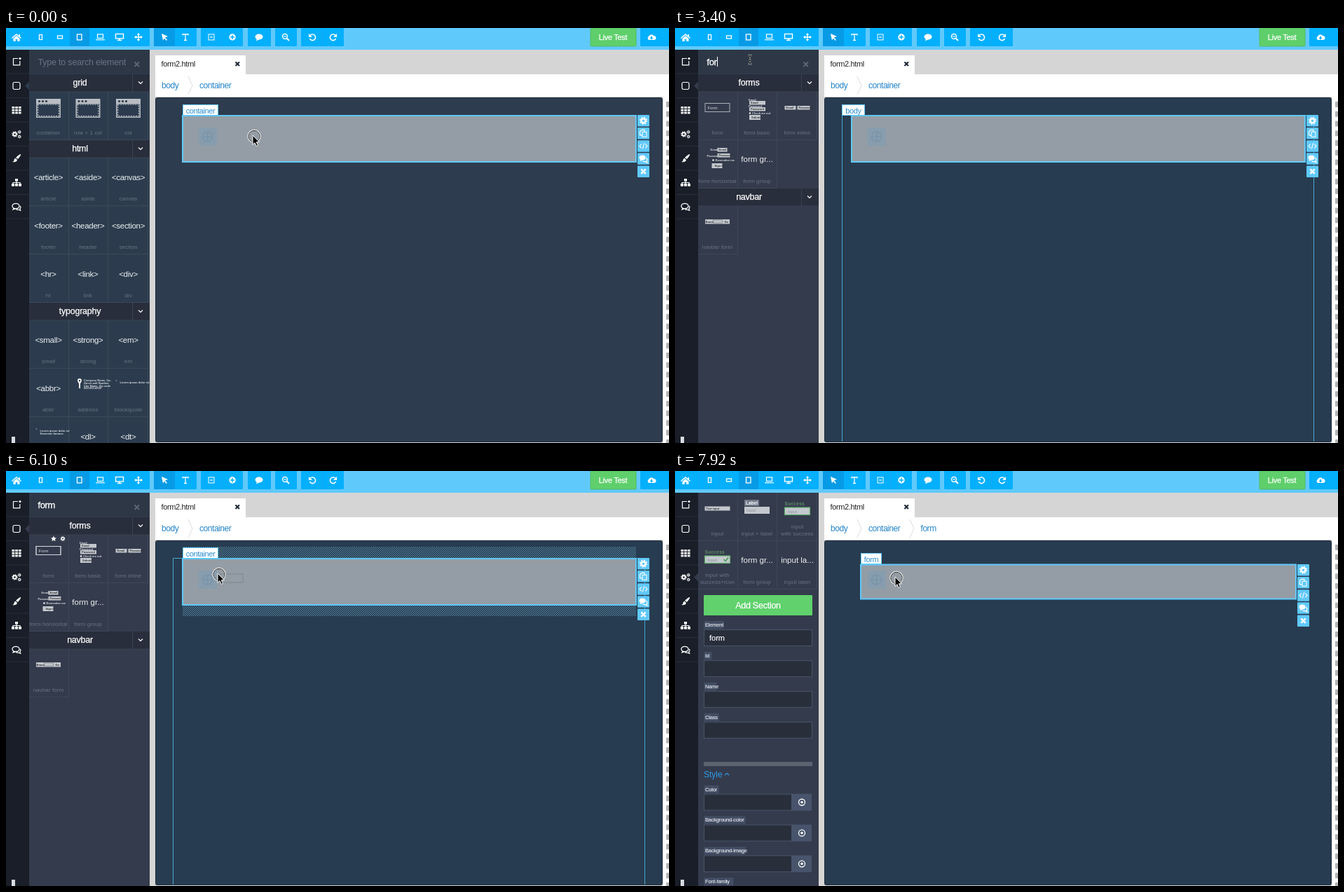
These frames come from a looping animation (946 by 592 pixels, 8000 ms). An HTML page:

```html
<!DOCTYPE html>
<html lang="en">
<head>
<meta charset="utf-8">
<title>Form builder</title>
<style>
html, body { margin: 0; width: 100%; height: 100%; overflow: hidden; background: #d5d5d5; }
svg { display: block; width: 946px; height: 592px; font-family: "Liberation Sans", Arial, sans-serif; }
text { white-space: pre; }
.tile { font-size: 8px; letter-spacing: .08px; fill: #687382; }
.code { font-size: 11.5px; letter-spacing: -.3px; fill: #eef0f2; }
.more { font-size: 11.5px; fill: #eef0f2; }
.head { font-size: 12.5px; letter-spacing: -.25px; fill: #fff; stroke: #fff; stroke-width: .25; }
.crumb { font-size: 12px; letter-spacing: -.45px; fill: #2585c8; }
.tag { font-size: 11px; letter-spacing: -.4px; fill: #2b8fce; }
.tab { font-size: 11px; letter-spacing: -.35px; fill: #222; }
.live { font-size: 11px; letter-spacing: -.3px; fill: #fff; stroke: #fff; stroke-width: .25; }
.hint { font-size: 12.5px; letter-spacing: -.2px; fill: #667384; }
.typed { font-size: 13px; letter-spacing: -.4px; fill: #fff; stroke: #fff; stroke-width: .35; }
.label { font-size: 7.5px; letter-spacing: -.2px; fill: #e4e8ee; stroke: #e4e8ee; stroke-width: .15; }
.field { font-size: 11px; fill: #fff; stroke: #fff; stroke-width: .2; }
.style { font-size: 12px; fill: #2f9be6; }
.tiny { font-size: 4px; fill: #d8dce0; font-weight: bold; }
.dark { font-size: 4px; fill: #333; font-weight: bold; }
</style>
</head>
<body>
<svg id="stage" viewBox="0 0 946 592"></svg>
<script>
const BLUE = '#04affb', SKY = '#60c9fb', LINE = '#3d4858', GREY = '#949da5';

const rect = (x, y, w, h, fill, more = '') =>
  `<rect x="${x}" y="${y}" width="${w}" height="${h}" fill="${fill}" ${more}/>`;
const frame = (x, y, w, h, color, width = 1, fill = 'none') =>
  rect(x, y, w, h, fill, `stroke="${color}" stroke-width="${width}"`);
const text = (x, y, s, cls, anchor = 'start') =>
  `<text x="${x}" y="${y}" class="${cls}" text-anchor="${anchor}">${s.replace(/</g, '&lt;')}</text>`;
const line = (d, color = '#fff', width = 1.2) =>
  `<path d="${d}" fill="none" stroke="${color}" stroke-width="${width}"/>`;
const shape = (d, fill = '#fff') => `<path d="${d}" fill="${fill}"/>`;
const dot = (x, y, r, fill = '#fff') => `<circle cx="${x}" cy="${y}" r="${r}" fill="${fill}"/>`;
const ring = (x, y, r, color = '#fff', width = 1.2) =>
  `<circle cx="${x}" cy="${y}" r="${r}" fill="none" stroke="${color}" stroke-width="${width}"/>`;
const at = (x, y, body, scale = 1) => `<g transform="translate(${x} ${y}) scale(${scale})">${body}</g>`;
const group = (id, body) => `<g id="${id}">${body}</g>`;

// Icons are centred on 0,0.
const gear = ring(0, 0, 3, '#fff', 2.4) +
  `<circle r="4.8" fill="none" stroke="#fff" stroke-width="1.7" stroke-dasharray="1.9 1.87"/>`;
const bubble = '<ellipse cy="-.5" rx="5.5" ry="4" fill="#fff"/>' + shape('M-3 2L-4 5.5L1 3Z');
const chats = '<ellipse cx="-1.5" cy="-1.5" rx="4.5" ry="3.4" fill="#fff"/>' + shape('M-4 1L-5 4L-1 1.5Z') +
  line('M3.5 -1.5Q7 1 4.5 3.5L5.5 5.5L2 4Q0 4.3 -1 3.3', '#fff', 1.3);
const cross = line('M-3.2 -3.2L3.2 3.2M3.2 -3.2L-3.2 3.2', '#fff', 2.4);
const turn = line('M-3 -2.5A4.3 4.3 0 1 1 -3.6 2.2', '#fff', 1.6) + shape('M-5 -5V0H0Z');
const chevron = line('M-3 -1.5L0 1.5L3 -1.5');
const icons = {
  home: shape('M-7 0L0 -6L7 0L6 1L0 -4L-6 1ZM-4.5 1L0 -3L4.5 1V5H1.3V2H-1.3V5H-4.5ZM3.5 -5H5V-1H3.5Z'),
  pointer: shape('M-4 -5L5 -1L1 .5L4 4L2.7 5L0 1.7L-2 4.5Z'),
  move: line('M-4 0H4M0 -4V4', '#fff', 1.4) +
    shape('M-6 0L-3 -2.2V2.2ZM6 0L3 -2.2V2.2ZM0 -6L-2.2 -3H2.2ZM0 6L-2.2 3H2.2Z'),
  laptop: frame(-4, -4, 8, 5.5, '#fff', 1.2) + line('M-6.5 3.8H6.5'),
  desktop: frame(-5.5, -4.5, 11, 6.5, '#fff', 1.4) + line('M0 2V4.5M-3 4.5H3', '#fff', 1.5),
  type: line('M-4 -2.5V-4H4V-2.5M0 -4V4.5M-2 4.5H2', '#fff', 1.3),
  zoom: ring(-1, -1, 3.5, '#fff', 1.4) + line('M1.7 1.7L5 5', '#fff', 2) + line('M-2.8 -1H.8'),
  cloud: shape('M-4 4A3 3 0 0 1 -4 -1A4 4 0 0 1 3 -2A3 3 0 0 1 4 4Z') + shape('M-1 -1H1V1H2.5L0 3.5L-2.5 1H-1Z', BLUE),
  edit: line('M2 -4.5H-4.5V4.8H4.8V-1') + dot(5, -4.5, 1.6),
  square: `<rect x="-5" y="-5" width="10" height="10" rx="2" fill="none" stroke="#fff" stroke-width="1.2"/>`,
  grid: [0, 1, 2, 3, 4, 5, 6, 7, 8].map(i => rect(-6.5 + i % 3 * 4.7, -5 + (i / 3 | 0) * 3.8, 3.7, 2.8, '#fff')).join(''),
  gears: at(-2.5, 0, gear, .75) + at(4.2, -3.2, gear, .45) + at(4.2, 3.4, gear, .45),
  brush: shape('M6 -6Q7 -5 2 1L-1 -1Q4 -6 6 -6ZM-1.5 -.3L1 2Q0 6 -6 5Q-3 4 -3.5 2Q-3 0 -1.5 -.3Z'),
  tree: rect(-2, -5.5, 4, 3.5, '#fff') + line('M0 -2V2M-5 2V0H5V2') +
    [-7, -2, 3].map(x => rect(x, 1.5, 4, 3.7, '#fff')).join(''),
  chats: at(0, 0, '<ellipse cx="-1" cy="-1" rx="5" ry="3.7" fill="none" stroke="#fff" stroke-width="1.3"/>' +
    line('M5 -1Q7 1 4.7 3L5.7 5.3L2 4Q0 4.2 -1 3.6M-4 2L-5 4L-2 3'))
};

function topBar() {
  const plates = [[0, 205], [211, 61], [278, 60], [345, 33], [384, 31], [421, 61], [905, 41]];
  return rect(0, 0, 946, 31, SKY) + plates.map(([x, w]) => rect(x, 0, w, 26, BLUE, 'rx="1"')).join('') +
    rect(91, 0, 28, 26, '#079be6') + rect(211, 0, 30, 26, '#079be6') +
    line('M33.5 0V26M62.5 0V26M146.5 0V26M175.5 0V26M307.5 0V26M451.5 0V26', '#16a6ee', 1) +
    at(15, 14, icons.home) + frame(47.5, 9.5, 4, 7, '#fff', 1.3) + frame(73.5, 11, 7, 4, '#fff', 1.3) +
    frame(101.5, 9, 6.5, 8, '#fff', 1.3) + at(134.5, 13, icons.laptop) + at(162, 13, icons.desktop) +
    at(189, 13, icons.move) + at(226, 13, icons.pointer) + at(256, 13, icons.type) +
    frame(289, 9, 8, 8, '#fff') + line('M291 13H295') +
    dot(323, 13, 4.7) + line('M320 13H326M323 10V16', BLUE, 1.5) + at(361, 13, bubble) +
    at(399, 13, icons.zoom) + at(437, 13, turn) + `<g transform="translate(467 13) scale(-1 1)">${turn}</g>` +
    rect(834, 0, 65, 26, '#5fcf6b', 'rx="1" stroke="#52bd62"') + text(866, 17, 'Live Test', 'live', 'middle') +
    at(921, 13, icons.cloud);
}

function rail() {
  const names = ['edit', 'square', 'grid', 'gears', 'brush', 'tree', 'chats'];
  return rect(0, 31, 33, 561, '#191e28') + names.map((name, i) => {
    const y = 48 + i * 34.5;
    return at(15, y, icons[name]) + line(`M0 ${y + 17}H33`, '#292f3b', 1);
  }).join('') + rect(8, 583, 5, 9, '#d8dbdf') + '<path id="notch" d="M33 -6L27 0L33 6Z" fill="#2c3c4e"/>';
}

const heading = (y, name) => rect(33, y, 172, 25, '#282e3b') + line(`M180.5 ${y}V${y + 25}M33 ${y + 25}H205`, '#3a4251', 1) +
  text(105.5, y + 16, name, 'head', 'middle') + at(192, y + 12, chevron);

const colX = [60.5, 117, 174.5];
const tile = (col, y, label, body) => {
  const left = [33, 89, 146][col];
  return line(`M${left} ${y + 68.5}H${left + 56.5}V${y}`, LINE, 1) + at(colX[col], y, body) +
    label.split('|').map((s, i, all) => text(colX[col], y + 61 - (all.length - 1 - i) * 10, s, 'tile', 'middle')).join('');
};
const tag = name => text(0, 32, `<${name}>`, 'code', 'middle');
const windowThumb = rect(-17.5, 10, 35, 27, '#b9bdc2') + rect(-16, 17.5, 32, 18, '#2c3c4e') +
  [-13, -8, -3].map(x => dot(x, 13.5, 1.6, '#2c3c4e')).join('') +
  `<rect x="-15" y="18" width="30" height="16.5" fill="none" stroke="#c5c8cc" stroke-width="1.2" stroke-dasharray="2 1.5"/>`;
const plate = (x, y, w, s = '') => rect(x, y, w, 5.5, '#c3c8ce') + text(x + 2, y + 4.2, s, 'dark');
const formBox = frame(-17.5, 16.5, 35, 12, '#aab1ba') + `<text x="-14" y="25" font-size="6" fill="#d4d8dc">Form</text>`;
const quote = text(-18, 19, '“', 'tiny') + text(-12, 21, 'Lorem ipsum dolor sit', 'tiny');

function elementList() {
  const row = (y, names) => names.map((n, i) => tile(i, y, n, tag(n))).join('');
  const address = shape('M-15 17A3 3 0 0 1 -9 17Q-10 20 -11 21V28H-13V21Q-14 20 -15 17Z') + dot(-12, 17, 1.2, '#2c3c4e') +
    ['Company Name, Inc.', 'Street and Number', 'City Name, Zip code', '000-000-0000'].map((s, i) =>
      text(-6, 18 + i * 3.8, s, 'tiny')).join('');
  return heading(66, 'grid') + ['container', 'row + 1 col', 'col'].map((s, i) => tile(i, 91, s, windowThumb)).join('') +
    heading(160, 'html') + row(185, ['article', 'aside', 'canvas']) + row(254, ['footer', 'header', 'section']) +
    row(323, ['hr', 'link', 'div']) + heading(392, 'typography') + row(417, ['small', 'strong', 'em']) +
    tile(0, 486, 'abbr', tag('abbr')) + tile(1, 486, 'address', address) + tile(2, 486, 'blockquote', quote) +
    tile(0, 555, '', quote + text(-12, 25, 'Someone famous', 'tiny')) + tile(1, 555, '', tag('dl')) + tile(2, 555, '', tag('dt'));
}

function formList() {
  const basic = text(-12, 13, 'Email', 'tiny') + plate(-11, 13, 23, 'Email') + text(-12, 22, 'Password', 'tiny') +
    plate(-11, 22, 23, 'Password') + dot(-10, 30.5, 1.2) + text(-7, 32, 'Check me out', 'tiny') + rect(-11, 33, 16, 7, '#c3c8ce') + text(-8, 38, 'Submit', 'dark');
  const side = text(-10, 15, 'Email', 'tiny') + plate(0, 11, 14, 'Email') + text(-15, 24, 'Password', 'tiny') +
    plate(0, 19, 18, 'Password') + dot(-6, 28.5, 1.2) + text(-3, 30, 'Remember me', 'tiny') + rect(-8, 33, 15, 7, '#c3c8ce') + text(-4, 38, 'Sign in', 'dark');
  const bar = rect(-17.5, 19, 35, 6.5, '#c3c8ce') + text(-17, 24, 'Brand', 'dark') + frame(-6, 20, 13, 4, '#777', .7) + text(10, 24, 'Go', 'dark');
  return heading(66, 'forms') + tile(0, 91, 'form', formBox) + tile(1, 91, 'form basic', basic) +
    tile(2, 91, 'form inline', plate(-18, 20, 16, 'Email') + plate(0, 20, 18, 'Password')) +
    tile(0, 160, 'form horizontal', side) + tile(1, 160, 'form group', text(0, 31, 'form gr...', 'more', 'middle')) +
    heading(229, 'navbar') + tile(0, 254, 'navbar form', bar);
}

function settings() {
  const success = (mark = '') => `<text x="-18" y="18" font-size="6.5" font-weight="bold" letter-spacing=".3" fill="#5f8d66">Success</text>` +
    frame(-18, 21, 36, 10.5, '#5fae6c', 1.2, '#c3c8ce') + `<text x="-14" y="28.5" font-size="6" fill="#8b929b">Input</text>` + mark;
  const words = s => text(0, 31, s, 'more', 'middle');
  const label = (y, s) => rect(41.5, y, s.length * 3.45 + 4, 11, '#434e64') + text(43, y + 8, s, 'label');
  const field = (y, s, w = 154) => label(y, s) + frame(41.5, y + 12.5, w, 23, '#49556a', 1, '#282f3b');
  const picker = (y, s) => field(y, s, 125) + rect(167, y + 12, 28, 24, '#48546c') + ring(181, y + 24, 4.5, '#fff', 1.3) + dot(181, y + 24, 1.8);
  return tile(0, 31, 'input', rect(-18, 19.5, 36, 6, '#c3c8ce') + text(-16, 24, 'Text input', 'dark')) +
    tile(1, 31, 'input + label', rect(-18, 10, 21, 9, '#727b8a') + `<text x="-16" y="17" font-size="6.5" font-weight="bold" fill="#fff">Label</text>` +
      rect(-18, 20, 36, 10, '#c3c8ce') + `<text x="-15" y="27" font-size="6" fill="#8b929b">Input</text>`) +
    tile(2, 31, 'input|with success', success()) +
    tile(0, 100, 'input with|success+icon', success(line('M9 26L11.5 28.5L15.5 23.5', '#4d9c5b', 1.7))) +
    tile(1, 100, 'form group', words('form gr...')) + tile(2, 100, 'input label', words('input la...')) +
    rect(41, 177, 155, 29, '#60d16c', 'rx="1"') + text(118.5, 196, 'Add Section', 'head', 'middle') +
    ['Element', 'Id', 'Name', 'Class'].map((s, i) => field(214 + i * 43.9, s)).join('') + text(49, 242, 'form', 'field') +
    rect(41, 415, 155, 6, '#5b6270') + text(41, 437, 'Style', 'style') + line('M71 434L74 431L77 434', '#2f9be6', 1.1) +
    ['Color', 'Background-color', 'Background-image', 'Font-family'].map((s, i) => picker(448.5 + i * 43.9, s)).join('');
}

function workspace() {
  const chev = x => line(`M${x} 69L${x + 6} 82L${x} 95`, '#dcdcdc', 1);
  let marks = '';
  for (let y = 105; y < 590; y += 13.77) marks += rect(942, y, 4, 8, '#b4b4b4');
  return rect(205, 31, 741, 561, '#d5d5d5') + rect(213, 39, 129, 28, '#fff') + text(221.5, 55, 'form2.html', 'tab') +
    line('M327.5 48.5L333 54M333 48.5L327.5 54', '#1d2733', 2.1) + rect(213, 66, 733, 32, '#fff') +
    rect(937, 98, 9, 494, '#fff') + marks + text(222, 86, 'body', 'crumb') + chev(260) + text(276, 86, 'container', 'crumb') +
    group('crumb', chev(335) + text(350.5, 86, 'form', 'crumb')) +
    '<rect id="canvas" x="213.5" y="99.5" width="723" height="491" rx="2" stroke="#1f2c3a"/>';
}

const nameTag = (x, y, w, s) => frame(x + .5, y + .5, w - 1, 15, SKY, 1, '#fff') + text(x + w / 2, y + 12.5, s, 'tag', 'middle');
const tools = (x, y) => [
  gear,
  frame(-1.5, -2, 6, 7, '#fff') + line('M-1.5 2.5H-5V-2.5L-2.5 -5H1.5V-2'),
  line('M-2.7 -3L-5.5 0L-2.7 3M2.7 -3L5.5 0L2.7 3M1.2 -4L-1.2 4', '#fff', 1.1),
  chats, cross
].map((icon, i) => rect(x, y + i * 18.1, 17, 16.5, SKY, 'rx="1"') + at(x + 8.5, y + 8.2 + i * 18.1, icon)).join('');
const plus = rect(274.5, 142, 26.5, 26, '#879dae', 'rx="2"') + ring(287.5, 155, 7, '#7592a8') + line('M281.5 155H293.5M287.5 149V161', '#7592a8');
const bodyLines = line('M238.5 590V124.5H252M899 124.5H911.5V590', '#4ba6d3', 1);
const container = frame(252, 125, 647, 66, SKY, 2, GREY) + plus;
const hatch = rect(252, 108, 647, 16, 'url(#stripes)') + rect(252, 192, 647, 15, 'url(#stripes)');
const containerTag = nameTag(252, 109, 51, 'container');
const sideTools = tools(901, 124);

const scenes = {
  container: container + containerTag + sideTools,
  body: bodyLines + container + nameTag(238, 109, 33, 'body') + sideTools,
  drag: bodyLines + container + sideTools,
  drop: bodyLines + hatch + container + containerTag + sideTools,
  hover: frame(252, 125, 647, 66, SKY, 2) + frame(265.5, 133.5, 620, 48, '#a9c6d6', 1, GREY) + plus + nameTag(265, 117, 30, 'form') + sideTools,
  form: frame(265, 133.5, 621, 49, SKY, 2, GREY) + plus + nameTag(265, 117, 30, 'form') + tools(888, 133)
};
const panels = { elements: elementList(), forms: formList(), settings: settings() };

const stage = document.getElementById('stage');
stage.innerHTML =
  `<defs><pattern id="stripes" width="3" height="3" patternUnits="userSpaceOnUse">${rect(0, 0, 3, 3, '#273d50')}
  ${line('M-1 1L1 -1M0 3L3 0M2 4L4 2', '#5b93af', .9)}</pattern></defs>` +
  workspace() + Object.keys(scenes).map(k => group('scene-' + k, scenes[k])).join('') +
  '<rect id="sideLeft" x="33" y="31" width="97" height="561"/><rect id="sideRight" x="130" y="31" width="75" height="561"/>' +
  group('search', rect(33, 31, 172, 34, '#2d3746') + text(45.5, 52.5, 'Type to search element', 'hint') +
    text(45.5, 52.5, '', 'typed') + rect(0, 41, 1, 14, '#fff', 'id="caret"') + line('M183.5 48.5L190 55M190 48.5L183.5 55', '#5b6675', 2)) +
  Object.keys(panels).map(k => group('panel-' + k, panels[k])).join('') + rail() + topBar() +
  group('lit', frame(43, 107.5, 35, 12, '#d5dae0') + at(68, 96.5, shape('M0 -4L1.2 -1.3L4 -1L2 .8L2.5 3.6L0 2.2L-2.5 3.6L-2 .8L-4 -1L-1.2 -1.3Z')) + at(81, 96.5, gear, .6)) +
  group('cursor',
    group('ghost', frame(1, 1, 35, 12, '#7d8790')) +
    group('press', ring(2, 1.5, 8.7, '#fff', 2) + ring(2, 1.5, 8.2, '#222', 1)) +
    group('arrow', '<path d="M0 0V13.5L3 10.7L5.2 15.5L7.5 14.4L5.3 9.8H9.4Z" fill="#000" stroke="#fff" stroke-width="1"/>') +
    group('beam', line('M-3 -6.5Q0 -6.5 0 -4.5Q0 -6.5 3 -6.5M0 -5V5M-3 6.5Q0 6.5 0 4.5Q0 6.5 3 6.5M-1.5 1.5H1.5', '#c9ced4', 2) +
      line('M-3 -6.5Q0 -6.5 0 -4.5Q0 -6.5 3 -6.5M0 -5V5M-3 6.5Q0 6.5 0 4.5Q0 6.5 3 6.5M-1.5 1.5H1.5', '#111', 1)));

const warm = '#343b4c', cool = '#2c3c4e';
// Each step keeps what it does not change.
const steps = [
  [0, { pos: [352, 153], press: 1, arrow: 1, beam: 0, ghost: 0, lit: 0, typed: '', caret: 0, scene: 'container', panel: 'elements', side: [cool, cool], canvas: '#2d3c4e' }],
  [150, { press: 0 }],
  [1230, { pos: [262, 118] }],
  [1370, { pos: [229, 104], scene: 'body', canvas: '#273c50', side: [cool, warm] }],
  [1520, { pos: [182, 80] }],
  [1670, { pos: [150, 63] }],
  [1820, { pos: [126, 52], arrow: 0, beam: 1 }],
  [1970, { pos: [112, 47] }],
  [2210, { pos: [105, 46] }],
  [2350, { pos: [107, 45] }],
  [2500, { caret: 1 }],
  [2950, { caret: 0 }],
  [3250, { typed: 'f', caret: 1 }],
  [3400, { typed: 'for', panel: 'forms', side: [warm, warm] }],
  [3550, { typed: 'form' }],
  [4000, { caret: 0 }],
  [4600, { caret: 1 }],
  [4750, { pos: [92, 72], arrow: 1, beam: 0 }],
  [4900, { pos: [74, 102], lit: 1 }],
  [5050, { pos: [66, 111], caret: 0 }],
  [5200, { pos: [66, 112], press: 1 }],
  [5350, { pos: [118, 126], ghost: 1, scene: 'drag' }],
  [5500, { pos: [201, 142] }],
  [5650, { pos: [264, 147], scene: 'drop' }],
  [5800, { pos: [302, 146] }],
  [6240, { press: 0, ghost: 0, lit: 0, scene: 'hover' }],
  [6690, { pos: [314, 151] }],
  [6870, { scene: 'form', panel: 'settings' }],
  [7920, { press: 1 }]
];
let last = {};
const states = steps.map(([time, change]) => (last = { ...last, ...change, time }));

const el = id => document.getElementById(id);
const show = (id, on) => { el(id).style.display = on ? '' : 'none'; };
const [hint, typed] = el('search').querySelectorAll('text');
let shown;

function draw(s) {
  for (const k in scenes) show('scene-' + k, k === s.scene);
  for (const k in panels) show('panel-' + k, k === s.panel);
  for (const k of ['press', 'arrow', 'beam', 'ghost', 'lit', 'caret']) show(k, s[k]);
  const inSettings = s.panel === 'settings';
  show('search', !inSettings);
  show('crumb', inSettings);
  el('notch').setAttribute('transform', `translate(0 ${inSettings ? 151.5 : 82.5})`);
  el('notch').setAttribute('fill', s.side[0]);
  el('sideLeft').setAttribute('fill', s.side[0]);
  el('sideRight').setAttribute('fill', s.side[1]);
  el('canvas').setAttribute('fill', s.canvas);
  hint.style.display = s.typed ? 'none' : '';
  typed.textContent = s.typed;
  el('caret').setAttribute('x', s.typed ? 46 + typed.getComputedTextLength() : 46);
  el('cursor').setAttribute('transform', `translate(${s.pos})`);
}

const start = performance.now();
function tick(now) {
  const t = Math.max(0, now - start) % 8000;
  const state = states.findLast(s => s.time <= t);
  if (state !== shown) draw(shown = state);
  requestAnimationFrame(tick);
}
tick(start);
</script>
</body>
</html>
```
